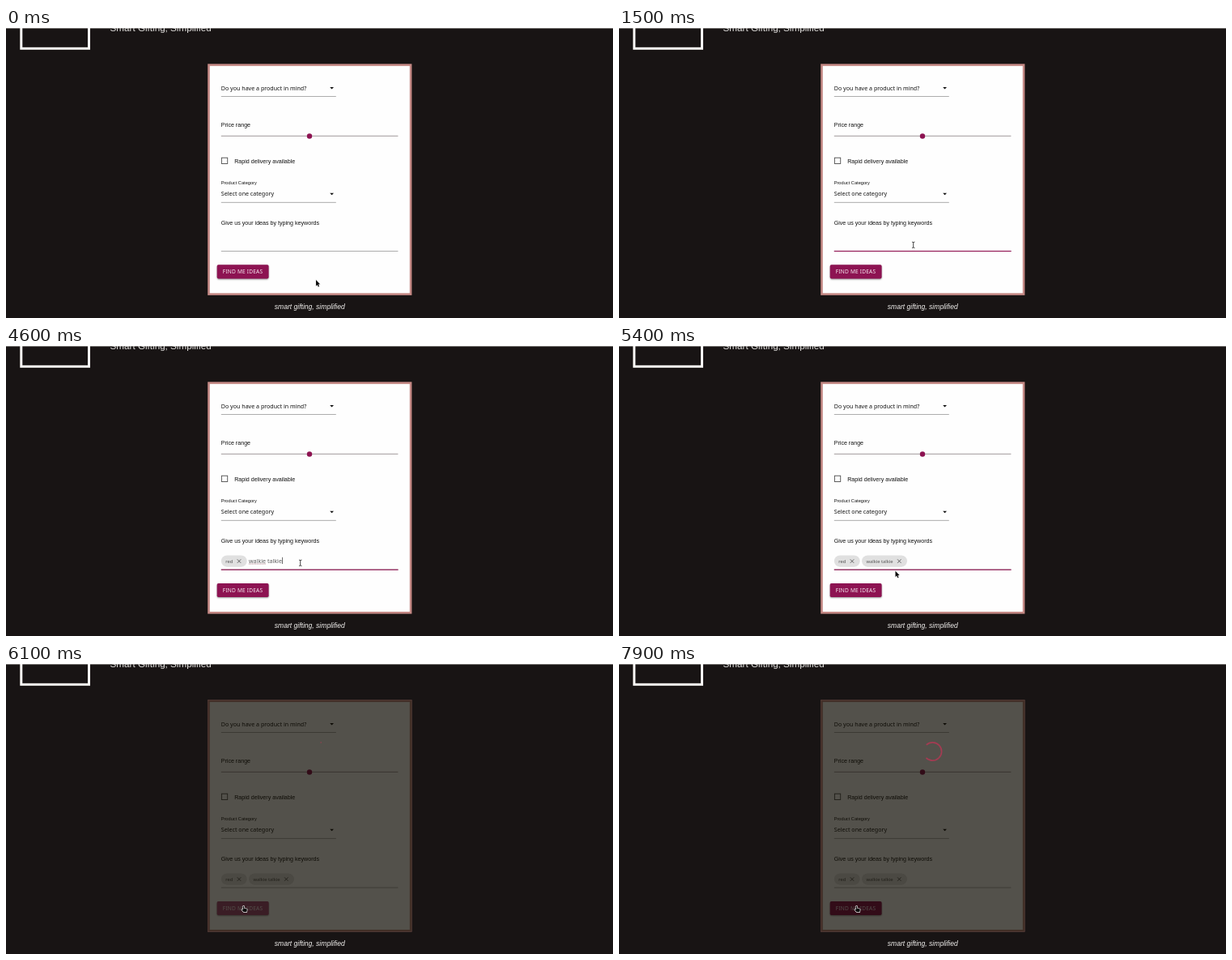
These frames come from a looping animation (750 by 358 pixels, 8 s). An HTML page with a canvas:

```html
<!DOCTYPE html>
<html lang="en">
<head>
<meta charset="utf-8">
<title>Gift finder form</title>
<style>
  html, body { margin: 0; width: 100%; height: 100%; overflow: hidden; background: #181414; }
  canvas { display: block; width: 750px; height: 358px; }
</style>
</head>
<body>
<canvas id="stage" width="750" height="358"></canvas>
<script>
const ctx = document.getElementById('stage').getContext('2d');
const LOOP = 8000, STEP = 100;
const SANS = '"Liberation Sans", Arial, sans-serif';
const NOTO = '"Noto Sans", sans-serif';
const PLUM = '#8d1352', INK = '#111';
const CLICK_INPUT = 900, CHIP_ONE = 2000, CHIP_TWO = 4800, CLICK_BUTTON = 5950, LOADING = 6080;

// What the keyword field holds from each moment on
const TYPING = [
  [0, ''], [1700, 're'], [1800, 'red'], [CHIP_ONE, ''], [2600, 'wa'], [2800, 'wal'],
  [3000, 'walk'], [3300, 'walki'], [3400, 'walkie'], [3600, 'walkie '], [3700, 'walkie t'],
  [4000, 'walkie ta'], [4100, 'walkie tal'], [4300, 'walkie talk'], [4400, 'walkie talki'],
  [4600, 'walkie talkie'], [CHIP_TWO, '']
];

const clamp = v => Math.max(0, Math.min(1, v));
const span = (t, from, to) => clamp((t - from) / (to - from));
const mix = (a, b, p) => a + (b - a) * p;
const easeOut = p => 1 - (1 - p) ** 3;
const easeInOut = p => p * p * (3 - 2 * p);

function rect(x, y, w, h, fill) {
  ctx.fillStyle = fill;
  ctx.fillRect(x, y, w, h);
}

function roundRect(x, y, w, h, r, fill) {
  ctx.beginPath();
  ctx.roundRect(x, y, w, h, r);
  ctx.fillStyle = fill;
  ctx.fill();
}

function polygon(points) {
  ctx.beginPath();
  points.forEach(([x, y]) => ctx.lineTo(x, y));
  ctx.closePath();
}

function text(str, x, y, size, family, fill = INK, style = '') {
  ctx.font = `${style} ${size}px ${family}`;
  ctx.fillStyle = fill;
  ctx.fillText(str, x, y);
  return ctx.measureText(str).width;
}

function drawHeader() {
  rect(0, 0, 750, 358, '#181414');
  rect(0, 0, 750, 0.8, '#8d8a88');
  ctx.strokeStyle = '#fbf9f6';
  ctx.lineWidth = 3;
  ctx.strokeRect(18.8, -20, 83.7, 45.3);
  text('Smart Gifting, Simplified', 128.6, 4, 11.66, SANS, '#e4e2e0');
}

function drawSelect(label, y) {
  text(label, 265.8, y, 7.1, NOTO);
  ctx.fillStyle = INK;
  polygon([[400.2, y - 3.6], [405, y - 3.6], [402.6, y - 1.2]]);
  ctx.fill();
  rect(265.8, y + 7.5, 142, 0.7, '#8c8c8c');
}

function drawChip(label, x, width) {
  roundRect(x, 258.5, width, 14.2, 7.1, '#e0e0e0');
  text(label, x + 5.4, 267.6, 5.78, NOTO, '#555');
  const cx = x + width - 9.7, cy = 265.6;
  ctx.strokeStyle = '#555';
  ctx.lineWidth = 0.9;
  ctx.beginPath();
  ctx.moveTo(cx - 2.2, cy - 2.2);
  ctx.lineTo(cx + 2.2, cy + 2.2);
  ctx.moveTo(cx + 2.2, cy - 2.2);
  ctx.lineTo(cx - 2.2, cy + 2.2);
  ctx.stroke();
}

function drawKeywords(t, shift) {
  if (t >= CHIP_ONE) drawChip('red', 265.9, 31.8);
  if (t >= CHIP_TWO) drawChip('walkie talkie', 300, 56);

  const typed = TYPING.filter(([at]) => at <= t).pop()[1];
  const x = t < CHIP_ONE ? 266 : t < CHIP_TWO ? 300 : 358;
  const width = text(typed, x, 267.6, 7.12, NOTO, '#5c5c5c');
  const caretOn = t >= CLICK_INPUT && t < 5300 && !(t >= 1500 && t < 1700);
  if (caretOn) rect(x + width + 0.1, 260.8, 0.7, 8.2, '#333');
  if (typed.startsWith('walkie ')) {
    for (let i = 0; i < 11; i++) rect(300 + i * 1.95, 268.6, 1.2, 0.8, '#a0707a');
  }

  const y = 275 + shift;
  rect(265.8, y, 218.6, 0.7, '#8c8c8c');
  const focus = easeOut(span(t, CLICK_INPUT, 1300));
  ctx.globalAlpha = 1 - span(t, CLICK_BUTTON - 10, LOADING);
  rect(375.2 - 109.4 * focus, y - 0.1, 218.8 * focus, 1.2, '#941c58');
  ctx.globalAlpha = 1;
}

function drawButton(t, shift) {
  const y = 292.2 + shift;
  ctx.save();
  ctx.shadowColor = 'rgba(0,0,0,.4)';
  ctx.shadowBlur = 2;
  ctx.shadowOffsetY = 1;
  roundRect(260.7, y, 63.9, 17.2, 1.8, PLUM);
  ctx.restore();

  ctx.letterSpacing = '0.19px';
  text('FIND ME IDEAS', 267.8, y + 10.9, 6.58, NOTO, '#f6e9f0');
  ctx.letterSpacing = '0px';

  const fade = 1 - span(t, 6100, 6700);
  if (t < CLICK_BUTTON || !fade) return;
  ctx.save();
  ctx.beginPath();
  ctx.roundRect(260.7, y, 63.9, 17.2, 1.8);
  ctx.clip();
  ctx.beginPath();
  ctx.arc(294, y + 8, mix(5, 42, easeOut(span(t, CLICK_BUTTON, 6300))), 0, 7);
  ctx.fillStyle = `rgba(255,255,255,${0.25 * fade})`;
  ctx.fill();
  ctx.restore();
}

function drawForm(t, shift) {
  rect(249.2, 44.3, 252.2, 285.6 + shift, '#c58985');
  rect(251.8, 46.9, 247, 280.4 + shift, '#fefefe');

  drawSelect('Do you have a product in mind?', 76.7);

  text('Price range', 265.7, 122.3, 7.12, SANS);
  rect(265.8, 132.8, 218.6, 1, '#a19a9b');
  ctx.beginPath();
  ctx.arc(375, 133.5, 3.2, 0, 7);
  ctx.fillStyle = PLUM;
  ctx.fill();

  ctx.strokeStyle = '#555';
  ctx.lineWidth = 0.95;
  ctx.strokeRect(266.4, 160.2, 7.3, 7.3);
  text('Rapid delivery available', 282.2, 166.7, 7.12, SANS);

  text('Product Category', 265.7, 193.2, 5.68, SANS);
  drawSelect('Select one category', 207.4);

  text('Give us your ideas by typing keywords', 265.7, 243.3, 7.12, SANS);
  drawKeywords(t, shift);
  drawButton(t, shift);
}

// Arc that grows from its head, then shrinks from its tail, while the ring turns
function drawSpinner(t) {
  const turns = (t - LOADING) / 1120;
  const phase = turns % 1;
  const grow = easeInOut(clamp(phase * 2));
  const shrink = easeInOut(clamp(phase * 2 - 1));
  const tail = 0.12 * grow + 0.87 * shrink;
  const head = Math.min(1, tail + 0.01 + 0.78 * grow);
  const angle = part => (turns + part - 0.25) * 2 * Math.PI;
  ctx.beginPath();
  ctx.arc(387.4, 108, 11.2, angle(tail), angle(head));
  ctx.strokeStyle = '#a23c52';
  ctx.lineWidth = 1.7;
  ctx.stroke();
}

function drawOutlined(points) {
  polygon(points);
  ctx.lineJoin = 'round';
  ctx.lineWidth = 1.3;
  ctx.strokeStyle = '#eee';
  ctx.stroke();
  ctx.fillStyle = '#0c0c0c';
  ctx.fill();
}

const cursors = {
  arrow() {
    drawOutlined([[0, 0], [0, 7.4], [1.7, 5.9], [2.8, 8.6], [4, 8.1], [2.9, 5.5], [5, 5.3]]);
  },
  beam() {
    ctx.strokeStyle = '#333';
    ctx.lineWidth = 0.9;
    ctx.beginPath();
    for (const side of [-1, 1]) {
      ctx.moveTo(side * 1.7, -3.7);
      ctx.lineTo(0, -3.2);
      ctx.moveTo(side * 1.7, 3.7);
      ctx.lineTo(0, 3.2);
    }
    ctx.moveTo(0, -3.2);
    ctx.lineTo(0, 3.2);
    ctx.stroke();
  },
  hand() {
    drawOutlined([[-0.6, 0], [0.5, 0], [0.7, 2.8], [3.8, 3.4], [4.2, 4.4], [3.8, 7.2],
      [0, 7.2], [-2.4, 4.4], [-1.9, 3.7], [-0.5, 4.4]]);
  }
};

function drawCursor(t) {
  const out = easeInOut(span(t, 0, 900));
  const back = easeInOut(span(t, 5100, 5900));
  const x = mix(mix(383, 363.7, out), 293.6, back);
  const y = mix(mix(311, 267.8, out), 298.9, back);
  const shape = y < 276 ? 'beam' : x < 324 && y > 292 ? 'hand' : 'arrow';
  ctx.save();
  ctx.translate(x, y);
  cursors[shape]();
  ctx.restore();
}

function draw(t) {
  const shift = t >= CHIP_ONE ? 0.7 : 0;
  drawHeader();
  drawForm(t, shift);
  text('smart gifting, simplified', 331.8, 347.2 + shift, 8.55, SANS, '#f2f0ee', 'italic');
  if (t >= LOADING) {
    rect(249.2, 44.3, 252.2, 285.6 + shift, 'rgba(12,9,0,.7)');
    drawSpinner(t);
  }
  drawCursor(t);
}

function tick() {
  const t = performance.now() % LOOP;
  draw(Math.floor(t / STEP) * STEP);
  requestAnimationFrame(tick);
}
tick();
</script>
</body>
</html>
```
